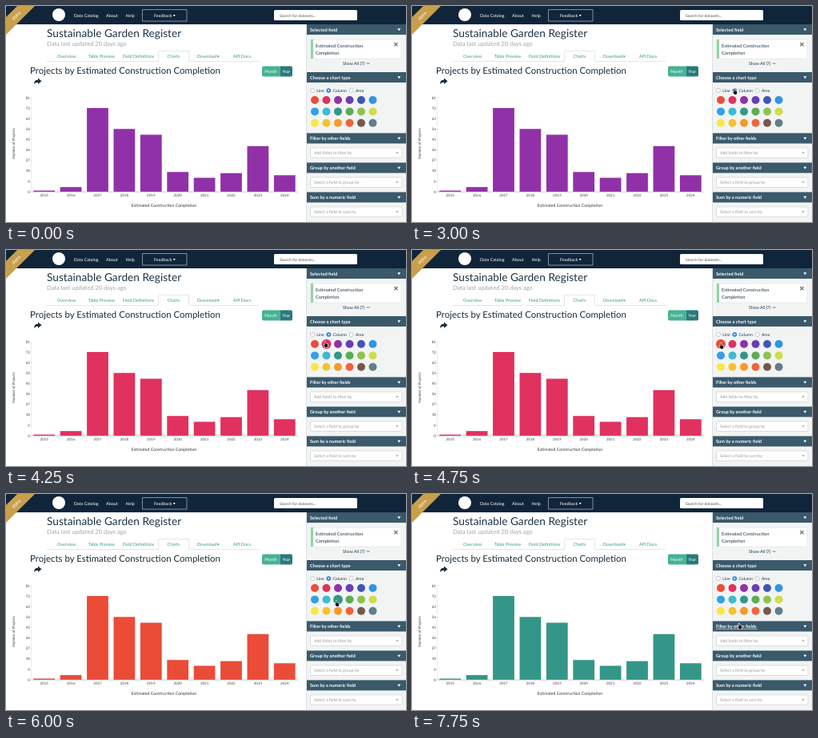
An HTML page with a canvas for the animation above (8000 ms loop, 500 by 271 pixels).

```html
<!DOCTYPE html>
<html lang="en">
<head>
<meta charset="utf-8">
<title>Chart colours</title>
<style>
  html, body { margin: 0; width: 100%; height: 100%; overflow: hidden; background: #fff; }
  canvas { display: block; }
</style>
</head>
<body>
<canvas id="stage" width="500" height="271"></canvas>
<script>
const ctx = document.getElementById('stage').getContext('2d');
const LOOP = 8000;

const NAVY = '#10253a', SLATE = '#3a596b', INK = '#1d3547', TEAL = '#349688';
const PURPLE = '#9131a8', PINK = '#e0315f', RED = '#ea4c38';

const swatches = [
  [RED, PINK, PURPLE, '#673fb4', '#4356b2', '#3294e4'],
  ['#349fe8', '#3dbbd2', TEAL, '#5cac52', '#8fc150', '#d2dd48'],
  ['#fae746', '#f8c12c', '#f69a28', '#f0633a', '#77574a', '#637d8a']
];
const values = [1, 4, 72, 54, 49, 17, 12, 16, 39.3, 14.2];

// Each step: start time, cursor x, y, shape
const cursorSteps = [
  [0, 0, 0, ''],
  [750, 358, 20.5, 'arrow'],
  [1000, 388, 86, 'arrow'],
  [1250, 390, 88.5, 'arrow'],
  [2250, 396, 95, 'arrow'],
  [2500, 400.5, 102, 'arrow'],
  [2750, 401, 104, 'hand'],
  [3250, 397, 115, 'hand'],
  [4500, 384, 117, 'hand'],
  [5500, 394, 117, 'arrow'],
  [5750, 411, 134, 'hand'],
  [7500, 411, 144, 'hand'],
  [7750, 407, 162.5, 'hand']
];
const barSteps = [[0, PURPLE], [4250, PINK], [5000, RED], [6250, TEAL]];
// Each step: start time, hovered swatch as row * 6 + column
const hoverSteps = [[0, -1], [3250, 1], [4500, 0], [5500, -1], [5750, 8], [7500, 14], [7750, -1]];

const at = (steps, t) => steps.filter(s => s[0] <= t).pop();

function rect(x, y, w, h, fill, stroke, radius = 0) {
  ctx.beginPath();
  ctx.roundRect(x, y, w, h, radius);
  if (fill) { ctx.fillStyle = fill; ctx.fill(); }
  if (stroke) { ctx.strokeStyle = stroke; ctx.lineWidth = 0.7; ctx.stroke(); }
}

function circle(x, y, r, fill, stroke) {
  ctx.beginPath();
  ctx.arc(x, y, r, 0, Math.PI * 2);
  if (fill) { ctx.fillStyle = fill; ctx.fill(); }
  if (stroke) { ctx.strokeStyle = stroke; ctx.lineWidth = 0.6; ctx.stroke(); }
}

function text(str, x, y, size, color = INK, align = 'left', weight = 400) {
  ctx.font = `${weight} ${size}px Lato, sans-serif`;
  ctx.textAlign = align;
  ctx.fillStyle = color;
  ctx.fillText(str, x, y);
}

function poly(points, fill, stroke) {
  ctx.beginPath();
  points.forEach(([x, y]) => ctx.lineTo(x, y));
  ctx.closePath();
  if (stroke) { ctx.strokeStyle = stroke; ctx.lineWidth = 1.2; ctx.stroke(); }
  ctx.fillStyle = fill;
  ctx.fill();
}

function line(points, color, width = 0.7) {
  ctx.beginPath();
  points.forEach(([x, y]) => ctx.lineTo(x, y));
  ctx.strokeStyle = color;
  ctx.lineWidth = width;
  ctx.stroke();
}

const caret = (x, y, color, s = 1.5) =>
  poly([[x - s, y - s / 2], [x + s, y - s / 2], [x, y + s]], color);

function rotatedText(str, x, y, angle, size, color) {
  ctx.save();
  ctx.translate(x, y);
  ctx.rotate(angle);
  text(str, 0, size * 0.33, size, color, 'center');
  ctx.restore();
}

function drawNav() {
  rect(0, 0, 500, 23, NAVY);
  circle(66, 11, 8, '#fff');
  text('Data Catalog', 85, 13.7, 5.4, '#fff');
  text('About', 125, 13.7, 5.4, '#fff');
  text('Help', 149.5, 13.7, 5.4, '#fff');
  rect(170.5, 4.5, 55.5, 14.5, null, '#b5bfc7');
  text('Feedback', 185, 13.7, 5.4, '#fff');
  caret(210.3, 11.7, '#fff');
  rect(335, 5, 104, 13, '#fff', null, 1.5);
  text('Search for datasets...', 342, 13.5, 5, '#555');
  poly([[14, 0], [36, 0], [0, 36], [0, 14]], '#c99f4c');
  rotatedText('alpha', 12.7, 12.3, -Math.PI / 4, 5.6, '#fff');
}

function drawHeading() {
  text('Sustainable Garden Register', 51, 38.7, 13.7);
  text('Data last updated 20 days ago', 51, 50, 7.55, '#a0a6aa');
  line([[51, 69.5], [190.5, 69.5], [190.5, 56.5], [228.5, 56.5], [228.5, 69.5], [317, 69.5]], '#d9dcde');
  [['Overview', 64], ['Table Preview', 103], ['Field Definitions', 146],
   ['Charts', 201.5], ['Download', 239], ['API Docs', 284]]
    .forEach(([label, x]) => text(label, x, 65, 5.45, '#2f9c86'));
  caret(265.3, 63.3, '#2f9c86');

  text('Projects by Estimated Construction Completion', 30, 84.5, 11.45, '#182b39');
  rect(320, 75.5, 22.5, 13, '#45b394', null, [2, 0, 0, 2]);
  rect(342.5, 75.5, 15.5, 13, '#2a7a7b', null, [0, 2, 2, 0]);
  text('Month', 331, 84, 5.2, '#fff', 'center');
  text('Year', 350.2, 84, 5.2, '#fff', 'center');

  // Share arrow
  ctx.beginPath();
  ctx.moveTo(35.3, 98.5);
  ctx.quadraticCurveTo(34.5, 92.8, 40, 92.8);
  ctx.lineTo(40, 90.5);
  ctx.lineTo(44.5, 94.3);
  ctx.lineTo(40, 98);
  ctx.lineTo(40, 95.7);
  ctx.quadraticCurveTo(36.5, 95.4, 35.3, 98.5);
  ctx.fillStyle = '#182b39';
  ctx.fill();
}

function drawChart(color) {
  const base = 233, unit = 118 / 81, step = 33.4;
  line([[31.5, 115], [31.5, base]], '#e2e2e2', 0.6);
  for (let v = 0; v <= 81; v += 9) {
    const y = base - v * unit;
    line([[31, y], [33, y]], '#ccc', 0.5);
    text(v, 30, y + 1.7, 4.6, '#444', 'right');
  }
  values.forEach((v, i) => {
    const x = 34.3 + i * step;
    rect(x, base - v * unit, 26.8, v * unit, color);
    text(2015 + i, x + 13.4, 239.2, 4.5, '#444', 'center');
  });
  line([[31.5, base + 0.3], [365, base + 0.3]], '#b5b5b5', 0.7);
  rotatedText('Number of Projects', 9.2, 172.5, -Math.PI / 2, 4.5, '#333');
  text('Estimated Construction Completion', 197.5, 251.8, 5.2, '#333', 'center');
}

function section(label, y) {
  rect(376, y, 124, 13, SLATE);
  text(label, 380, y + 8.5, 5.7, '#fff', 'left', 700);
  caret(491.3, y + 6.3, '#fff', 2);
}

function select(label, y) {
  rect(380.5, y, 114.5, 12.5, '#fff', '#ccd0d2', 1.5);
  text(label, 385, y + 8, 5.2, '#999');
  caret(489, y + 6, '#999');
}

function drawSidebar(hovered, underlined) {
  rect(375, 23, 125, 248, '#f2f4f4');
  line([[375.5, 23], [375.5, 271]], '#d4d9dc');
  section('Selected field', 23);
  rect(381, 42, 113, 24, '#fff', '#e2e5e6');
  rect(381, 42, 3, 24, '#93d3a2');
  text('Estimated Construction', 387, 52.3, 5.75);
  text('Completion', 387, 60.8, 5.75);
  line([[485.3, 46], [489.5, 50.2]], '#777', 1.3);
  line([[489.5, 46], [485.3, 50.2]], '#777', 1.3);
  text('Show All (7)', 421, 74, 5.3);
  line([[451, 71.2], [452.7, 73], [454.4, 71.2]], INK);

  section('Choose a chart type', 83);
  [['Line', 383], ['Column', 403.3], ['Area', 431.7]].forEach(([label, x]) => {
    const on = label === 'Column';
    circle(x, 106, 2.6, on ? '#2f83e8' : '#fff', on ? '#2f83e8' : '#aaa');
    if (on) circle(x, 106, 1, '#fff');
    text(label, x + 5.2, 107.8, 5.1);
  });
  swatches.forEach((row, r) => row.forEach((color, c) =>
    circle(386 + c * 14.5, 118 + r * 14.4, hovered === r * 6 + c ? 6 : 5, color)));

  section('Filter by other fields', 159.5);
  if (underlined) line([[380, 169.3], [432, 169.3]], '#fff', 0.6);
  select('Add fields to filter by', 178);
  section('Group by another field', 196.5);
  select('Select a field to group by', 215);
  section('Sum by a numeric field', 233.5);
  select('Select a field to sum by', 252);
}

function drawCursor(x, y, shape) {
  ctx.save();
  ctx.translate(x, y);
  if (shape === 'arrow') {
    poly([[0.5, 0], [0.5, 6], [1.9, 4.8], [2.8, 7], [3.8, 6.5], [2.9, 4.4], [4.7, 4.3]], '#111', '#fff');
  } else if (shape === 'hand') {
    poly([[1.4, 0], [2.4, 0], [2.5, 2.3], [5, 2.9], [5.4, 4], [4.7, 7], [2, 7], [0.2, 4.2], [0.6, 3.6], [1.4, 4.2]], '#111', '#fff');
  }
  ctx.restore();
}

function render(now) {
  const t = now % LOOP;
  ctx.textRendering = 'geometricPrecision';
  rect(0, 0, 500, 271, '#fff');
  drawHeading();
  drawChart(at(barSteps, t)[1]);
  drawSidebar(at(hoverSteps, t)[1], t >= 7750);
  drawNav();
  drawCursor(...at(cursorSteps, t).slice(1));
  requestAnimationFrame(render);
}
requestAnimationFrame(render);
</script>
</body>
</html>
```
